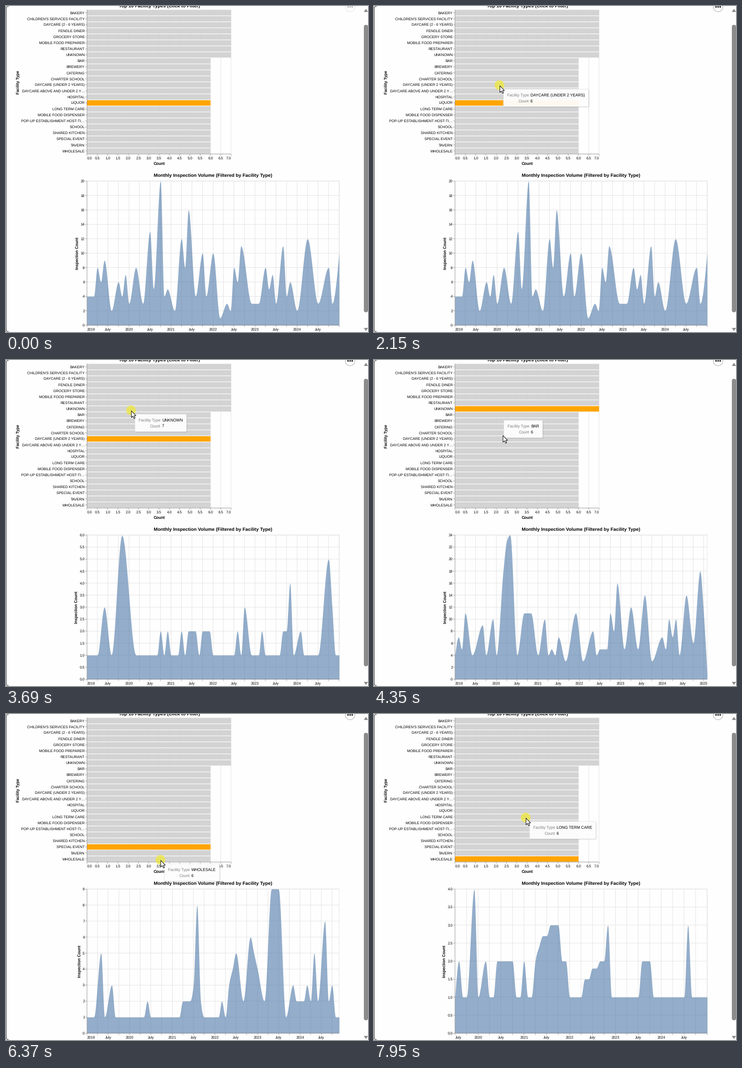
Animation of 789 by 710 pixels, one loop 8 s. Source, as a matplotlib script:

```python
import numpy as np
import matplotlib.pyplot as plt
from matplotlib.animation import FuncAnimation
from matplotlib.patches import Circle, FancyBboxPatch, Polygon

W, H, DPI = 789, 710, 64
LOOP, STEP_MS = 8000, 40
PT = 72 / DPI                      # points per pixel
SCALE = 0.785                      # zoom of the page
LABEL, AXIS, TITLE = 10 * SCALE, 11 * SCALE, 13 * SCALE

LEFT, PLOT_H = 176.6, 400 * SCALE
BAR_Y, BAR_W = 8.3, 400 * SCALE
AREA_Y, AREA_W = 381.2, 700 * SCALE
BAR_B, BAR_R = BAR_Y + PLOT_H, LEFT + BAR_W
AREA_B, AREA_R = AREA_Y + PLOT_H, LEFT + AREA_W
UNIT = BAR_W / 7

GREY, ORANGE, BLUE = "#d3d3d3", "#ffa500", "#4c78a8"
GRID, TICK = "#dddddd", "#888888"

FACILITIES = [
    "BAKERY", "CHILDREN'S SERVICES FACILITY", "DAYCARE (2 - 6 YEARS)",
    "FENDLE DINER", "GROCERY STORE", "MOBILE FOOD PREPARER", "RESTAURANT",
    "UNKNOWN", "BAR", "BREWERY", "CATERING", "CHARTER SCHOOL",
    "DAYCARE (UNDER 2 YEARS)", "DAYCARE ABOVE AND UNDER 2 YEARS", "HOSPITAL",
    "LIQUOR", "LONG TERM CARE", "MOBILE FOOD DISPENSER",
    "POP-UP ESTABLISHMENT HOST-TIER II", "SCHOOL", "SHARED KITCHEN",
    "SPECIAL EVENT", "TAVERN", "WHOLESALE",
]
COUNTS = [7] * 8 + [6] * 16
ROW = PLOT_H / len(FACILITIES)

plt.rcParams["font.family"] = "Liberation Sans"
plt.rcParams["text.hinting"] = "no_hinting"
fig = plt.figure(figsize=(W / DPI, H / DPI), dpi=DPI, facecolor="#fefefe")
ax = fig.add_axes([0, 0, 1, 1])
ax.axis("off")


def label(x, y, s, size=LABEL, ha="center", color="black", bold=False, turn=0, z=3):
    """Text whose capitals are centred on (x, y)."""
    drop = 0.36 * size
    dx, dy = (drop, 0) if turn else (0, drop)
    return ax.text(x + dx, y + dy, s, fontsize=size * PT, ha=ha, va="baseline",
                   color=color, weight="bold" if bold else "normal",
                   rotation=turn, rotation_mode="anchor", zorder=z)


def measure(s, size):
    probe = label(0, 0, s, size)
    width = probe.get_window_extent().width
    probe.remove()
    return width


def shorten(s, limit=180 * SCALE):
    if measure(s, LABEL) <= limit:
        return s
    while measure(s + "…", LABEL) > limit:
        s = s[:-1]
    return s + "…"


def lines(kind, at, lo, hi, color, z=0):
    draw = ax.vlines if kind == "v" else ax.hlines
    art = draw(at, lo, hi, colors=color, linewidths=0.8 * PT, zorder=z)
    art.set_snap(False)
    return art


def rounded(x, y, w, h, r, **style):
    return ax.add_patch(FancyBboxPatch(
        (x, y), w, h, boxstyle=f"round,pad=0,rounding_size={r}", **style))


# ---- page furniture
ax.plot([6, 2, 0.5, 0.5, 2, 6], [0, 1.5, 5, 705, 708.5, 710],
        color="#444444", lw=1.2 * PT)
rounded(780, 41, 9, 626, 4.4, fc="#8b8b8b", ec="none")
for tip, base in ((6, 13), (708, 701)):
    ax.add_patch(Polygon([(780, base), (789, base), (784.5, tip)], fc="#8b8b8b"))

menu = [ax.add_patch(Circle((750, 2), 10.5, fc="white", ec="#aaaaaa", lw=PT))]
menu += [ax.add_patch(Circle((750 + dx, 2), 1.6, fc="black", ec="none", zorder=3))
         for dx in (-4.5, 0, 4.5)]

# ---- bar chart
centres = BAR_Y + ROW * (np.arange(len(FACILITIES)) + 0.5)
ticks = np.arange(0, 7.1, 0.5)
tick_x = LEFT + ticks * UNIT
lines("v", tick_x, BAR_Y, BAR_B, GRID)
lines("h", [BAR_Y, BAR_B], LEFT, BAR_R, GRID)
bars = ax.barh(centres, np.array(COUNTS) * UNIT, 0.9 * ROW, left=LEFT,
               color=GREY, zorder=2)
for bar in bars:
    bar.set_snap(False)
lines("v", [LEFT], BAR_Y, BAR_B, TICK, 2.5)
lines("h", [BAR_B], LEFT, BAR_R, TICK, 2.5)
lines("v", tick_x, BAR_B, BAR_B + 4, TICK, 2.5)
lines("h", centres, LEFT - 4, LEFT, TICK, 2.5)
ax.set(xlim=(0, W), ylim=(H, 0))
ax.autoscale(False)
for y, name in zip(centres, FACILITIES):
    label(171.5, y, shorten(name), ha="right")
for v, x in zip(ticks, tick_x):
    label(x, 331.5, f"{v:.1f}", ha={0: "left", 7: "right"}.get(v, "center"))
label(334, -0.7, "Top 10 Facility Types (Click to Filter)", TITLE, bold=True)
label(334, 343, "Count", AXIS, bold=True)
label(26, 166, "Facility Type", AXIS, bold=True, turn=90)

# ---- area charts
label(451.5, 368.5, "Monthly Inspection Volume (Filtered by Facility Type)",
      TITLE, bold=True)
lines("h", [AREA_Y], LEFT, AREA_R, GRID)
lines("v", [AREA_R], AREA_Y, AREA_B, GRID)
lines("v", [LEFT], AREA_Y, AREA_B, TICK, 2.5)
lines("h", [AREA_B], LEFT, AREA_R, TICK, 2.5)


def with_valleys(peaks, top, reach):
    """Peaks {count: months} joined by valleys; taller peaks have wider feet."""
    keys = sorted((m, count) for count, months in peaks.items() for m in months)
    points = [keys[0]]
    for (a, va), (b, vb) in zip(keys, keys[1:]):
        gap = b - a
        if gap > 1:
            low = max(1, round(min(va, vb) * (0.7 if gap == 2 else 0.4)))
            wa, wb = (max(1, round(reach * v / top)) for v in (va, vb))
            if wa + wb < gap:
                points += [(a + wa, low), (b - wb, low)]
            else:
                points.append(((a + b) // 2, low))
        points.append((b, vb))
    return np.array(points).T


def monotone(x, y, n=12):
    """Monotone cubic through the points, sampled n times per segment."""
    h = np.diff(x)
    s = np.diff(y) / h
    mean = (s[:-1] * h[1:] + s[1:] * h[:-1]) / (h[:-1] + h[1:])
    small = np.minimum(np.minimum(abs(s[:-1]), abs(s[1:])), abs(mean) / 2)
    inner = (np.sign(s[:-1]) + np.sign(s[1:])) * small
    m = np.r_[(3 * s[0] - inner[0]) / 2, inner, (3 * s[-1] - inner[-1]) / 2]
    u = np.linspace(0, 1, n)[None, :]
    x0, y0, y1, hh = x[:-1, None], y[:-1, None], y[1:, None], h[:, None]
    m0, m1 = m[:-1, None] * hh, m[1:, None] * hh
    ys = (y0 * (1 + 2 * u) * (1 - u) ** 2 + m0 * u * (1 - u) ** 2
          + y1 * u * u * (3 - 2 * u) + m1 * u * u * (u - 1))
    return (x0 + hh * u).ravel(), ys.ravel()


def area_chart(peaks, step, reach, first=0):
    """Chart of one facility; first: its first month, counted from Jan 2019."""
    top = max(peaks)
    months, counts = with_valleys(peaks, top, reach)
    span = int(months[-1])
    start = np.datetime64("2019-01") + first

    def to_x(m):
        days = (start + np.r_[0, span, m].astype(int)).astype("datetime64[D]")
        days = days.astype(float)
        return LEFT + AREA_W * (days[2:] - days[0]) / (days[1] - days[0])

    x, y = monotone(to_x(months), counts)
    art = [ax.fill_between(x, AREA_B - y / top * PLOT_H, AREA_B, color=BLUE,
                           alpha=0.6, lw=0, zorder=2)]

    quarters = [m for m in range(span + 1) if (m + first) % 3 == 0]
    qx = to_x(quarters)
    values = np.arange(0, top + step / 2, step)
    vy = AREA_B - values / top * PLOT_H
    art += [lines("v", qx, AREA_Y, AREA_B, GRID),
            lines("h", vy, LEFT, AREA_R, GRID),
            lines("v", qx, AREA_B, AREA_B + 4, TICK, 2.5),
            lines("h", vy, LEFT - 4, LEFT, TICK, 2.5)]
    for m, px in zip(quarters, qx):
        year, month = divmod(m + first, 12)
        if month % 6 == 0 and px < AREA_R - 2:
            art.append(label(px, 704.5, "July" if month else str(2019 + year),
                             ha="center" if m else "left"))
    form = "{:.1f}" if step < 1 else "{:.0f}"
    names = [form.format(v) for v in values]
    art += [label(171.5, py, s, ha="right") for py, s in zip(vy, names)]
    title_x = 171.5 - measure(names[-1], LABEL) - 7.5
    art.append(label(title_x, (AREA_Y + AREA_B) / 2 + 1, "Inspection Count",
                     AXIS, bold=True, turn=90))
    return art


liquor = {3: [40], 4: range(3), 5: [23], 6: [9, 58], 7: [11, 53],
          8: [3, 14, 42, 51, 69], 9: [5], 10: [33, 36, 72], 11: [44, 56],
          12: [27, 63], 13: [18], 16: [29], 20: [21]}
daycare = {1: [0, 72], 2: [21, 23, 27, *range(29, 32), *range(33, 36), 43, 50, 56, 57, 61],
           3: [5, 45, 70], 4: [58], 5: [69], 6: [10]}
unknown = {1: [73], 4: [0], 5: [28, *range(42, 45)], 7: [1, 30, 60], 8: [40], 9: [8],
           10: [11, 26, 62, 64], 11: [3, *range(20, 23), 35, 45, 72], 12: [51],
           14: [55, 67], 16: [47], 18: [14, 71], 23: [15], 24: [16]}
special = {1: [0, 71], 2: [17, *range(27, 30), 32, 38, *range(59, 62)],
           3: [7, 30, 40, 58, 62, 69], 4: [41, 48], 5: [4, 42, 47, 64], 6: [46],
           7: [67], 8: [31], 9: range(52, 55)}
wholesale = {1: [0, 66], 1.5: [34, 35], 1.8: [36, 37],
             2: [1, 8, *range(11, 16), 18, 21, 28, 29, 38, 39, *range(49, 52)],
             2.4: [22], 2.7: [23, 24], 3: [25, 26, 27, 40, 61], 4: [5]}

# chart shown from each time on
CHARTS = [
    (0, area_chart(liquor, 2, 6)),
    (2350, area_chart(daycare, 0.5, 4)),
    (3890, area_chart(unknown, 2, 6)),
    (5290, area_chart(special, 1, 3)),
    (6630, area_chart(wholesale, 0.5, 1.5, first=6)),
]
CLICKS = [(2150, 2350), (3690, 3890), (5020, 5210), (6370, 6630), (7950, LOOP)]


# ---- pointer motion
def smooth(u):
    return (u * u * (3 - 2 * u)) ** 1.15


def ease_out(power):
    return lambda u: 1 - (1 - u) ** power


# start, end, steps, destination, easing, bend of x
ENTRY = (380, 912)
MOVES = [
    (590, 790, 4, (320.5, 324.5), ease_out(2), 1),
    (1190, 1750, 9, (273.5, 172.5), smooth, 1),
    (2830, 3300, 8, (272.5, 109.5), smooth, 1),
    (4280, 4560, 5, (298.5, 288), smooth, 1),
    (5710, 5900, 4, (336.5, 317.5), smooth, 1),
    (6900, 7670, 12, (330.5, 225.5), ease_out(4.3), 4),
]


def pointer(t):
    """Pointer position and the older position its tooltip still follows."""
    i = max(k for k, m in enumerate(MOVES) if m[0] <= t)
    t0, t1, n, b, ease, bend = MOVES[i]
    a = MOVES[i - 1][3] if i else ENTRY
    j = min(int((t - t0) / (t1 - t0) * (n - 1) + 0.2), n - 1)

    def at(k):
        f = ease((k + 1) / n)
        return a[0] + (b[0] - a[0]) * f ** bend, a[1] + (b[1] - a[1]) * f

    return at(j), at(j if j == n - 1 else j - 1)


def row_at(y):
    return int((y - BAR_Y) // ROW)


ARROW = np.array([(0, 0), (0, 14.5), (3.3, 11.4), (5.8, 16.6), (8.1, 15.6),
                  (5.8, 10.6), (10, 10.4)]) + (0.8, 1.3)
arrow = ax.add_patch(Polygon(ARROW, fc="white", ec="black", lw=PT,
                             joinstyle="round", zorder=14))
halo = ax.add_patch(Circle((0, 0), 10.5, fc="#f0ea30", ec="none", alpha=0.7, zorder=9))

shadows = [rounded(0, 0, 1, 1, 3, fc="black", ec="none", alpha=0.04, zorder=10)
           for _ in range(3)]
box = rounded(0, 0, 1, 1, 2, fc=(1, 1, 1, 0.95), ec="#dcdcdc", lw=0.8 * PT, zorder=11)
tip_text = [label(0, 0, s, AXIS, ha, c, z=12) for s, ha, c in (
    ("Facility Type", "right", "#808080"), ("Count", "right", "#808080"),
    ("", "left", "black"), ("", "left", "black"))]
tooltip = [box, *shadows, *tip_text]
TIP_W = [measure(name, AXIS) + 67 for name in FACILITIES]


def show(artists, on):
    for a in artists:
        a.set_visible(on)


def place_tooltip(x, y):
    row = row_at(y)
    on = 0 <= row < len(FACILITIES)
    show(tooltip, on)
    if not on:
        return
    left, top = x + 8.5, y + 8.5
    box.set_bounds(left, top, TIP_W[row], 38)
    for k, s in enumerate(shadows):
        s.set_bounds(left + k - 0.5, top + k, TIP_W[row] + 1, 38.5)
    tip_text[2].set_text(FACILITIES[row])
    tip_text[3].set_text(str(COUNTS[row]))
    for k, text in enumerate(tip_text):
        text.set_position((left + (55.5 if k < 2 else 59),
                           top + (13 if k % 2 == 0 else 25.3) + 0.36 * AXIS))


def update(i):
    t = i * STEP_MS + 30
    since, current = [c for c in CHARTS if c[0] <= t][-1]
    for _, art in CHARTS:
        show(art, art is current)
    chosen = row_at(pointer(since)[0][1]) if since else FACILITIES.index("LIQUOR")
    for k, bar in enumerate(bars):
        bar.set_facecolor(ORANGE if k == chosen else GREY)

    active = t >= MOVES[0][0]
    for part in menu:
        part.set_alpha(1 if active else 0.3)
    arrow.set_visible(active)
    halo.set_visible(any(a <= t < b for a, b in CLICKS))
    if active:
        pos, late = pointer(t)
        arrow.set_xy(ARROW + pos)
        halo.center = pos
        place_tooltip(*late)
    else:
        show(tooltip, False)
    return []


anim = FuncAnimation(fig, update, frames=LOOP // STEP_MS, interval=STEP_MS,
                     repeat=True, repeat_delay=0, blit=False)
plt.show()
```
